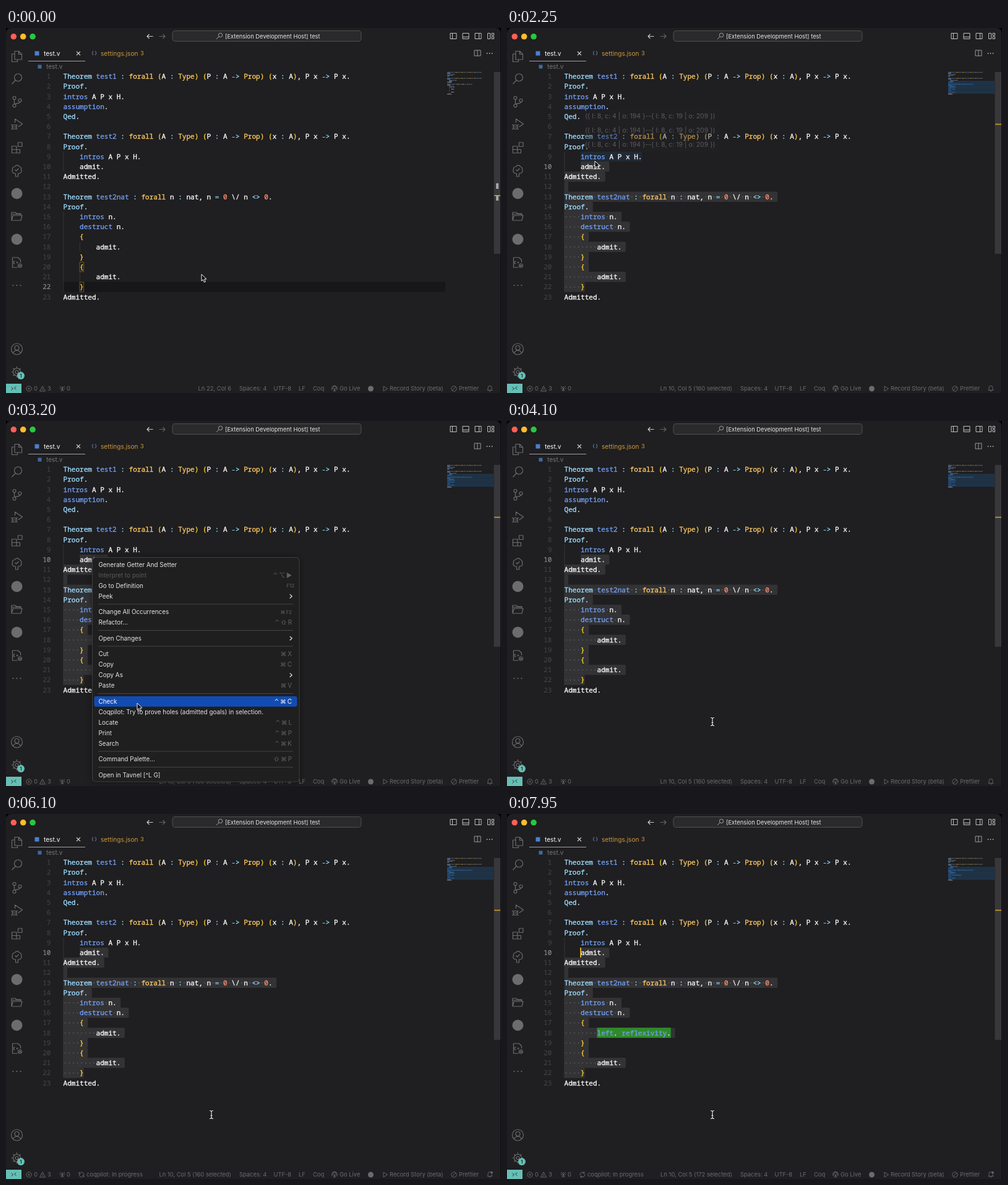
Recreate the animation shown at these times as an HTML page with a canvas. Size 800 by 590 pixels, loop 8 s.

```html
<!DOCTYPE html>
<html lang="en">
<head>
<meta charset="utf-8">
<title>Editor session</title>
<style>
html, body { margin: 0; width: 100%; height: 100%; overflow: hidden; background: #000; }
canvas { display: block; width: 800px; height: 590px; }
</style>
</head>
<body>
<canvas id="stage"></canvas>
<script>
const LOOP = 8000;
const PRESS = 500, RELEASE = 1950, HOVER = 2215, MENU_OPEN = 2600, MENU_PICK = 3650, PROGRESS = 5000, SOLVED = 7700;

const canvas = document.getElementById('stage');
const ctx = canvas.getContext('2d');
const dpr = window.devicePixelRatio || 1;
canvas.width = 800 * dpr;
canvas.height = 590 * dpr;

const BG = '#1f1e20', GREY = '#6c6b6d', TEAL = '#66bfb5';
const SANS = 'Inter, "DejaVu Sans", sans-serif';
const MONO = '500 11.05px "Noto Sans Mono", "DejaVu Sans Mono", monospace';
const X0 = 92.5, Y0 = 78.2, CW = 6.63, LH = 16.2;

const source = `Theorem test1 : forall (A : Type) (P : A -> Prop) (x : A), P x -> P x.
Proof.
intros A P x H.
assumption.
Qed.

Theorem test2 : forall (A : Type) (P : A -> Prop) (x : A), P x -> P x.
Proof.
    intros A P x H.
    admit.
Admitted.

Theorem test2nat : forall n : nat, n = 0 \\/ n <> 0.
Proof.
    intros n.
    destruct n.
    {
        admit.
    }
    {
        admit.
    }
Admitted.`.split('\n');

const solved = source.slice();
solved[17] = '        left. reflexivity.';

const styles = [
  [/^(Theorem|Proof|Qed)$/, '#9cdcfe'],
  [/^(test\d\w*|intros|destruct|assumption|left|reflexivity)$/, '#719ff3'],
  [/^(forall|Type|Prop)$/, '#fac863'],
  [/^[(){}]$/, '#fbd02f'],
  [/^\d+$/, '#f78c6c'],
  [/^(:|->|=|<>)$/, '#89ddff'],
];
const tokenColor = s => (styles.find(([re]) => re.test(s)) || [0, '#f8f8f8'])[1];
const tokens = line => [...line.matchAll(/\w+|->|<>|\\\/|[^\s\w]/g)]
  .map(m => ({ s: m[0], col: m.index, color: tokenColor(m[0]) }));

const clamp = (v, a, b) => Math.min(b, Math.max(a, v));
const lineY = n => Y0 + (n - 1) * LH;
const colX = c => X0 + c * CW;

function rect(x, y, w, h, color, r = 0) {
  ctx.fillStyle = color;
  ctx.beginPath();
  ctx.roundRect(x, y, w, h, r);
  ctx.fill();
}

function text(s, x, y, size, color, align = 'left', weight = 400) {
  ctx.font = `${weight} ${size}px ${SANS}`;
  ctx.fillStyle = color;
  ctx.textAlign = align;
  ctx.fillText(s, x, y + size * 0.36);
}

// A hairline outline gives the code its medium weight.
function code(s, x, y, color, outline = 0.35) {
  ctx.font = MONO;
  ctx.fillStyle = ctx.strokeStyle = color;
  ctx.textAlign = 'left';
  ctx.fillText(s, x, y + 3.9);
  ctx.lineWidth = outline;
  ctx.strokeText(s, x, y + 3.9);
}

function icon(d, x, y, color = GREY, width = 1.2, turn = 0) {
  ctx.save();
  ctx.translate(x, y);
  ctx.rotate(turn);
  ctx.strokeStyle = color;
  ctx.lineWidth = width;
  ctx.stroke(new Path2D(d));
  ctx.restore();
}

const ring = (x, y, r) => `M${x + r} ${y}a${r} ${r} 0 1 0 ${-2 * r} 0a${r} ${r} 0 1 0 ${2 * r} 0`;
const dot = (x, y, r, color) => rect(x - r, y - r, 2 * r, 2 * r, color, r);

const sideIcons = [
  [46, 'M-3.5-8.5h6.5l5 5v8.5h-11.500zM3-8.500v5h5M-3.500-4h-4.500v12.500h9v-3.500'],
  [82, ring(2, -2, 6) + 'M-2.300 2.500L-8 8.500'],
  [119, ring(-4, -6, 2.5) + ring(-4, 6.5, 2.5) + ring(5, -2, 2.5) + 'M-4-3.500V4M5 .5C5 4-1 2-3.500 4.200'],
  [156, 'M-3-3v-6l12 8-7 5' + ring(-4, 4, 3.5) + 'M-7.500 4h7M-9 0l2 2M-9 8l2-1.500M1 0l-2 2M1 8l-2-1.500'],
  [194, 'M-8-3h7.500v11h-7.500zM-8 2.500h13v5.500h-5.500v-5.500M2-9h6.500v6.500h-6.500z'],
  [231, 'M-2 4H-4A4 4 0 0 1-7-2 4 4 0 0 1-3-7 4 4 0 0 1 4-7 4 4 0 0 1 7-2 4 4 0 0 1 4 4H2M-2 4v5h4V4M-3-2l2 2 4-4'],
  [304, 'M-8.500 7v-13h6l2 2h7v3M-8.500 7h15l2-8h-14.500l-2.500 8M-8.500-3h15'],
  [379, 'M1 8h-8v-16h9l4 4v4M-3-2h-2v4h2M-1 0h3M.5-1.500v3' + ring(5, 5, 3) + ring(5, 5, 1)],
  [519, ring(0, 0, 9) + ring(0, -2, 3.5) + 'M-6 6.500C-4 .8 4 .8 6 6.500'],
  [556, ring(0, 0, 6) + ring(0, 0, 2.5) + 'M0-6v-3M0 6v3M-6 0h-3M6 0h3M-4-4l-2-2M4-4l2-2M-4 4l-2 2M4 4l2 2'],
];

const mousePath = [
  [0, 316, 398], [80, 316, 398], [430, 127, 418], [540, 127, 418], [1080, 159, 288], [1200, 159, 288],
  [1850, 120, 222], [1980, 120, 222], [2180, 142, 215], [2350, 142, 215], [2550, 139, 220], [2700, 140, 222],
  [3150, 212, 456], [3250, 212, 456], [3500, 300, 470], [3700, 300, 470], [3950, 332, 486], [LOOP, 332, 486],
];

function mouseAt(t) {
  const i = Math.max(1, mousePath.findIndex(p => p[0] >= t));
  const [t0, x0, y0] = mousePath[i - 1], [t1, x1, y1] = mousePath[i];
  const k = (t - t0) / (t1 - t0), e = k * k * (3 - 2 * k);
  return { x: x0 + (x1 - x0) * e, y: y0 + (y1 - y0) * e };
}

function caretAt(t, mouse) {
  if (t < PRESS) return { line: 22, col: 5 };
  if (t >= RELEASE) return { line: 10, col: 4 };
  const line = clamp(Math.round((mouse.y - Y0) / LH) + 1, 1, 22);
  return { line, col: clamp(Math.round((mouse.x - X0) / CW), 0, source[line - 1].length) };
}

function countSelected(lines, caret) {
  return lines.slice(caret.line - 1, 22).join('\n').length - caret.col;
}

function drawTitle() {
  ['#ff5f57', '#febc2e', '#28c840'].forEach((c, i) => dot(12.3 + i * 15.4, 13.8, 4.8, c));
  icon('M5 0h-9.500M-1-3.500l-3.500 3.500 3.500 3.500', 232.500, 13.5, '#c8c8c8');
  icon('M-5 0h9.500M1-3.500l3.500 3.500-3.500 3.500', 252.500, 13.5, '#626163');
  rect(268.5, 4, 306, 18, '#505051', 5);
  rect(269.5, 5, 304, 16, '#2a292b', 4);
  icon(ring(1.5, -1.5, 3.2) + 'M-1 1l-4 4', 345, 13, '#a5a5a5', 1);
  text('[Extension Development Host] test', 354, 13.3, 9.4, '#e6e6e6');
  const box = 'M-5-4.500h10v9h-10z';
  icon(box + 'M-1.500-4.500v9', 723, 13, '#c0c0c0', 1);
  icon(box + 'M-5 1.500h10', 743, 13, '#c0c0c0', 1);
  icon(box + 'M1.500-4.500v9', 763, 13, '#c0c0c0', 1);
  icon('M-5-4.500h4v9h-4zM1.500-4.500h3.500v3.500h-3.500zM1.500 1h3.500v3.500h-3.500z', 783.5, 13, '#c0c0c0', 1);
}

function drawTabs() {
  rect(46.5, 37.5, 7, 7, '#4a80d0');
  text('test.v', 61, 41, 10.1, '#ffffff');
  icon('M-3-3l6 6M3-3l-6 6', 117, 41, '#d0d0d0', 1.1);
  rect(36, 53, 92, 1, '#a09fa1');
  text('{ }', 142.5, 40.5, 7.5, '#6289b8', 'center', 600);
  text('settings.json', 153, 41, 10.1, '#c99a3a');
  text('3', 217, 41, 9.3, '#c99a3a');
  icon('M-5-4.500h10v9h-10zM0-4.500v9', 762, 40.5, '#9a9a9a', 1);
  for (let i = -1; i < 2; i++) dot(781.5 + i * 4, 41, 0.9, '#b0b0b0');
  rect(51.5, 59.5, 6, 6, '#41699f');
  text('test.v', 65, 62.5, 10.1, '#777678');
}

function drawSidebar() {
  sideIcons.forEach(([y, d]) => icon(d, 17.5, y));
  dot(17.5, 267.5, 9, GREY);
  dot(17.5, 341.5, 9, GREY);
  for (let i = -1; i < 2; i++) dot(17.5 + i * 6, 416, 1.1, GREY);
  dot(24, 562, 6, TEAL);
  text('1', 24, 562, 8, '#1b2a2a', 'center', 600);
}

function drawStatus(t, lines, caret) {
  const label = (s, x, align) => text(s, x, 583, 9.4, GREY, align);
  const antenna = 'M0-1v5.500M-1.500 4.500l1.500-4 1.500 4M-2 1a2.800 2.800 0 1 1 4 0M-3.500 2.500a4.500 4.500 0 1 1 7 0';
  rect(0, 575, 25, 15, TEAL);
  icon('M-4-2l3 2.500-3 2.500M4-3l-3 2.500 3 2.500', 12.5, 582.5, '#243b39', 1);
  icon(ring(0, 0, 4.2) + 'M-1.700-1.700l3.400 3.400M1.700-1.700l-3.400 3.400', 37, 583, GREY, 0.9);
  label('0', 45);
  icon('M0-4.200l4.500 8.200h-9zM0-1v2.500M0 2.300v.8', 59, 583, GREY, 0.9);
  label('3', 67);
  icon('M-4-4l4 4 4-4M0-4v8M-2 4l2-4 2 4M-4-1l1.500 2M4-1l-1.500 2', 91, 583, GREY, 0.9);
  label('0', 98);
  if (t >= PROGRESS) {
    const turn = (t - PROGRESS) / 1500 * 2 * Math.PI;
    icon('M-4 .5a4 4 0 0 1 7.200-2.700M4-.5a4 4 0 0 1-7.200 2.700M3.500-4.500v2.500h-2.500M-3.500 4.500v-2.500h2.500', 122, 583, GREY, 0.9, turn);
    label('coqpilot: In progress', 130);
  }
  const count = t >= PRESS ? countSelected(lines, caret) : 0;
  label(`Ln ${caret.line}, Col ${caret.col + 1}` + (count ? ` (${count} selected)` : ''), 364, 'right');
  label('Spaces: 4', 377);
  label('UTF-8', 432.5);
  label('LF', 473);
  label('Coq', 496);
  icon(antenna, 531, 583, GREY, 0.9);
  label('Go Live', 539);
  dot(589.5, 583, 4.5, GREY);
  icon('M-3-4l6.500 4-6.500 4z', 613, 583, GREY, 0.9);
  label('Record Story (beta)', 620);
  icon(ring(0, 0, 4.2) + 'M-3 3l6-6', 724, 583, GREY, 0.9);
  label('Prettier', 732);
  icon('M-4 2.500h8l-1-1.500v-2.500a3 3 0 0 0-6 0v2.500zM-1 3.500a1 1 0 0 0 2 0', 782, 583, GREY, 0.9);
  if (t >= PROGRESS) dot(785, 579.5, 1.8, GREY);
}

function drawMinimap(t, lines, caret) {
  lines.forEach((line, i) => {
    const n = i + 1, y = 71 + i * 1.6;
    const inside = t >= PRESS && n >= caret.line && n <= 22;
    if (inside) {
      const start = n === caret.line ? caret.col : 0;
      rect(713, y, 75, 1.65, '#1f3448');
      rect(713 + start * 0.79, y, (line.length - start + 1) * 0.79, 1.65, '#23486f');
    }
    ctx.globalAlpha = 0.55;
    tokens(line).forEach(k => rect(713 + k.col * 0.79, y + 0.2, k.s.length * 0.79, 1, inside ? '#3f78bd' : k.color));
    ctx.globalAlpha = 1;
  });
  rect(788.5, 71, 10.5, 294, '#38373a');
  if (t < 1150) [251, 270].forEach(y => rect(792, y, 4, 9, '#a5a4a6'));
  rect(789, 154.8 + (caret.line - 10) * 9.6, 10, 1.6, '#cfa128');
}

function drawSelection(lines, caret) {
  for (let n = caret.line; n <= 22; n++) {
    const line = lines[n - 1];
    const start = n === caret.line ? caret.col : 0;
    const end = line.length + (n < 22 ? 1 : 0);
    rect(colX(start), lineY(n) - LH / 2, (end - start) * CW, LH + 0.2, '#333234', [0, 2, 2, 0]);
  }
}

function drawSpaces(lines, caret) {
  for (let n = caret.line; n <= 22; n++) {
    [...lines[n - 1]].forEach((ch, c) => {
      if (ch === ' ' && (n > caret.line || c >= caret.col)) dot(colX(c + 0.5), lineY(n) + 0.3, 0.75, '#737274');
    });
  }
}

function drawEditor(t, lines, caret) {
  const selecting = t >= PRESS;
  if (selecting) drawSelection(lines, caret);
  else rect(92, lineY(22) - LH / 2, 618, LH, '#171618');

  const guide = (c, a, b) => rect(colX(c), lineY(a) - LH / 2, 0.8, (b - a + 1) * LH, '#3a393b');
  guide(0, 9, 10);
  guide(0, 15, 22);
  guide(4, 18, 18);
  guide(4, 21, 21);

  if (t < 1150) {
    ctx.strokeStyle = selecting ? '#594b28' : '#856a24';
    ctx.lineWidth = 0.8;
    [20, 22].forEach(n => ctx.strokeRect(colX(4), lineY(n) - 7.6, CW, 15.4));
  }
  if (t >= HOVER && t < MENU_OPEN) rect(colX(4), lineY(9) - LH / 2, 15 * CW, LH, '#1f2a35');
  if (t >= SOLVED) rect(colX(8), lineY(18) - LH / 2, 18 * CW, LH, '#2f8a2a');

  lines.forEach((line, i) => {
    const n = i + 1, y = lineY(n);
    code(String(n), 72.5 - String(n).length * CW, y, n === caret.line ? '#929193' : '#444345', 0.1);
    tokens(line).forEach(k => code(k.s, colX(k.col), y, k.color));
  });
  if (selecting) drawSpaces(lines, caret);

  const dragging = t >= PRESS && t < RELEASE;
  const menuOpen = t >= MENU_OPEN && t < MENU_PICK;
  if (dragging || (!menuOpen && t % 1000 >= 500)) {
    rect(colX(caret.col) - 0.8, lineY(caret.line) - LH / 2, 1.7, LH, '#f5c02f');
  }
}

function drawHover(t) {
  if (t < HOVER || t >= MENU_OPEN) return;
  ctx.globalAlpha = clamp((t - HOVER) / 100, 0, 1);
  rect(125, 131, 218, 69, '#232224', 3);
  for (let i = 0; i < 3; i++) {
    text('({ l: 8, c: 4 | o: 194 }--{ l: 8, c: 19 | o: 209 })', 126, 142.5 + i * 23, 10.5, '#c4c3c5');
  }
  ctx.globalAlpha = 1;
}

const menu = [
  ['Generate Getter And Setter'], ['Interpret to point', '⌃⌥▶', 'off'], ['Go to Definition', 'F12'], ['Peek', '>'], null,
  ['Change All Occurrences', '⌘F2'], ['Refactor...', '⌃⇧R'], null,
  ['Open Changes', '>'], null,
  ['Cut', '⌘X'], ['Copy', '⌘C'], ['Copy As', '>'], ['Paste', '⌘V'], null,
  ['Check', '⌃⌘C'], ['Coqpilot: Try to prove holes (admitted goals) in selection.'],
  ['Locate', '⌃⌘L'], ['Print', '⌃⌘P'], ['Search', '⌃⌘K'], null,
  ['Command Palette...', '⇧⌘P'], null,
  ['Open in Tavnel [^L G]'],
];

function drawShortcut(key, y, color) {
  const size = key.includes('F') ? 7.8 : 9.9;
  const spaced = key.replace(/[⌃⌥⇧⌘]/g, '$&\u2009');
  text(spaced, key === 'F12' ? 466 : 462, y, size, color, 'right');
}

function drawMenu(t, mouse) {
  if (t < MENU_OPEN || t >= MENU_PICK) return;
  ctx.save();
  ctx.shadowColor = 'rgba(0,0,0,.45)';
  ctx.shadowBlur = 8 * dpr;
  rect(139, 220, 335.5, 363.5, '#4a494b', 6);
  ctx.restore();
  rect(139.8, 220.8, 333.9, 361.9, '#1f1f20', 5.3);
  let y = 232.3;
  for (const item of menu) {
    if (!item) {
      rect(149, y - 4.7, 315, 0.9, '#444345');
      y += 8.5;
      continue;
    }
    const [name, key, off] = item;
    const active = !off && Math.abs(mouse.y - y) <= 8.5;
    if (active) rect(142.5, y - 8.3, 328, 16.8, '#124cb2', 3);
    text(name, 149.5, y, 9.9, off ? '#5a595b' : active ? '#ffffff' : '#e6e5e7');
    if (key === '>') icon('M-1.800-3.200l3.500 3.200-3.500 3.200', 460.5, y, '#e6e5e7', 1.2);
    else if (key) drawShortcut(key, y, active ? '#ffffff' : '#626163');
    y += 17;
  }
}

function drawMouse(t, { x, y }) {
  const near = (a, b) => t >= a && t < b;
  if (near(PRESS, RELEASE) || near(2550, 2650) || near(3580, MENU_PICK)) {
    ctx.beginPath();
    ctx.arc(x + 0.5, y + 1.5, 16.8, 0, 2 * Math.PI);
    ctx.fillStyle = 'rgba(38,37,39,.55)';
    ctx.fill();
    ctx.strokeStyle = '#a2a1a3';
    ctx.lineWidth = 1.1;
    ctx.stroke();
  }
  if (t >= MENU_PICK) {
    const beam = 'M-3-6.500Q0-6.500 0-4.500Q0-6.500 3-6.500M0-4.500V4.500M-3 6.500Q0 6.500 0 4.500Q0 6.500 3 6.500M-1.500 1.500h3';
    icon(beam, x, y, '#111', 3);
    icon(beam, x, y, '#eee', 1.2);
    return;
  }
  const arrow = new Path2D('M0 0v11l2.500-2.300 1.900 4.300 2-.9-1.900-4.200h3.600z');
  ctx.save();
  ctx.translate(x, y);
  ctx.fillStyle = '#0c0c0c';
  ctx.fill(arrow);
  ctx.strokeStyle = '#f0f0f0';
  ctx.lineWidth = 1;
  ctx.stroke(arrow);
  ctx.restore();
}

function draw(t) {
  const lines = t >= SOLVED ? solved : source;
  const mouse = mouseAt(t);
  const caret = caretAt(t, mouse);
  ctx.setTransform(dpr, 0, 0, dpr, 0, 0);
  ctx.lineJoin = 'round';
  rect(0, 0, 800, 590, '#000');
  rect(0, 0, 799.5, 590, BG, [8, 8, 0, 0]);
  drawTitle();
  drawTabs();
  drawSidebar();
  drawEditor(t, lines, caret);
  drawMinimap(t, lines, caret);
  drawStatus(t, lines, caret);
  drawHover(t);
  drawMenu(t, mouse);
  drawMouse(t, mouse);
}

const begin = performance.now();
function tick() {
  draw((performance.now() - begin) % LOOP);
  requestAnimationFrame(tick);
}
tick();
</script>
</body>
</html>
```
